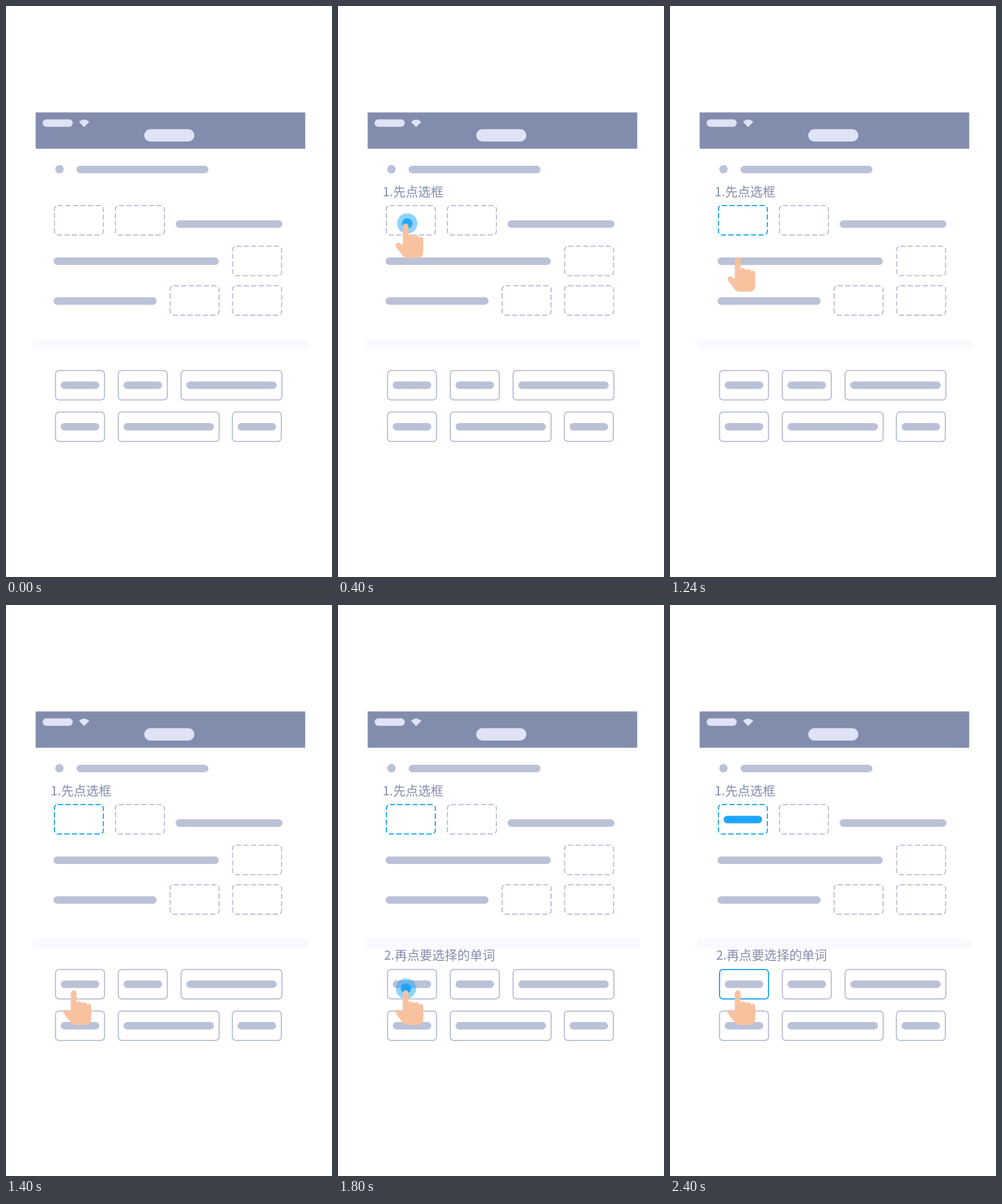
An HTML page with a canvas that plays this animation: 566 px wide and 990 px high, repeating every 3.24 s.

```html
<!DOCTYPE html>
<html lang="zh">
<head>
<meta charset="utf-8">
<title>Fill in the blanks</title>
<style>
html, body { margin: 0; width: 100%; height: 100%; overflow: hidden; background: #fff; }
canvas { display: block; width: 566px; height: 990px; }
</style>
</head>
<body>
<canvas id="stage" width="566" height="990"></canvas>
<script>
const ctx = document.getElementById('stage').getContext('2d');
const LOOP = 3240, STEP = 40;
const GREY = [187, 193, 215], BLUE = [31, 166, 252];
const INK = '#828cad', PALE = '#e0e2f5', SKIN = '#f9c29f';

const rgb = c => `rgb(${c.map(Math.round).join()})`;
const mix = k => rgb(GREY.map((v, i) => v + (BLUE[i] - v) * k));
const ramp = (t, from, to) => Math.min(1, Math.max(0, (t - from) / (to - from)));
const easeOut = k => 1 - (1 - k) ** 3;

const hand = new Path2D(
  'M12.5 38V5.2a5 5 0 0 1 10 0V21.5C24 18.3 30.5 18.3 32 23' +
  'C34 19.3 40 20.3 40.7 25C43.5 21.8 48 23.8 48 28.5V49' +
  'Q48 60 37 60H21Q15 60 11.5 55L1 41C-2 36 3.5 31.3 7.5 34.5Z');

function pill(x, y, w, h = 13, color = rgb(GREY)) {
  ctx.fillStyle = color;
  ctx.beginPath();
  ctx.roundRect(x, y, w, h, h / 2);
  ctx.fill();
}

function frame(x, y, w, color = rgb(GREY), dash = []) {
  ctx.strokeStyle = color;
  ctx.lineWidth = 2;
  ctx.setLineDash(dash);
  ctx.beginPath();
  ctx.roundRect(x + 1, y + 1, w - 2, 51, 6);
  ctx.stroke();
}

const slot = (x, y, color) => frame(x, y, 87, color, [9, 4.08]);

function word(x, y, w, color) {
  frame(x, y, w, color);
  pill(x + 10, y + 20, w - 20);
}

function disc(x, y, r, color) {
  ctx.fillStyle = color;
  ctx.beginPath();
  ctx.arc(x, y, r, 0, Math.PI * 2);
  ctx.fill();
}

function faded(alpha, draw) {
  if (alpha <= 0) return;
  ctx.save();
  ctx.globalAlpha = alpha;
  draw();
  ctx.restore();
}

function label(text, x, y, alpha) {
  faded(alpha, () => {
    ctx.fillStyle = INK;
    ctx.font = '300 21.8px "Noto Sans CJK SC", "Noto Sans CJK", sans-serif';
    ctx.fillText(text, x, y);
  });
}

function ripple(x, y, scale) {
  if (scale <= 0) return;
  faded(0.5, () => disc(x, y, 17.6 * scale, rgb(BLUE)));
  disc(x, y, 9 * scale, rgb(BLUE));
}

function header() {
  ctx.fillStyle = INK;
  ctx.fillRect(51.5, 184.5, 468, 63);
  pill(63.5, 196.5, 52.5, 13, PALE);
  pill(240, 213.5, 87, 21.5, PALE);
  ctx.fillStyle = PALE;
  ctx.beginPath();
  ctx.moveTo(135.7, 210);
  ctx.lineTo(126.8, 201);
  ctx.quadraticCurveTo(135.7, 193.2, 144.7, 201);
  ctx.fill();
}

function draw(t) {
  const enter = easeOut(ramp(t, 0, 360));
  const pick = ramp(t, 800, 1000);
  const drop = ramp(t, 1200, 1400);
  const hint = easeOut(ramp(t, 1400, 1760));
  const fill = ramp(t, 2200, 2400);

  ctx.fillStyle = '#fff';
  ctx.fillRect(0, 0, 566, 990);
  header();

  disc(92.8, 283, 7.3, rgb(GREY));
  pill(122.5, 277, 229);
  label('1.先点选框', 77.5, 329.5, enter);

  slot(83, 345, mix(pick));
  slot(189, 345);
  pill(294.5, 371.5, 185.5);
  pill(82.5, 436, 287);
  slot(392.5, 415.5);
  pill(82.5, 505, 179);
  slot(284, 484);
  slot(392.5, 484);
  faded(fill, () => pill(93, 365.5, 67, 13, rgb(BLUE)));

  ctx.fillStyle = '#f9f9ff';
  ctx.fillRect(47.5, 579.5, 477, 15.5);
  label('2.再点要选择的单词', 80, 615.2, hint);

  word(85, 631, 87, mix(fill));
  word(194, 631, 87);
  word(303, 631, 177);
  word(85, 703, 87);
  word(194, 703, 177);
  word(392, 703, 87);

  if (t >= 400) ripple(120.2, 377, 1 - pick);
  if (t >= 1800) ripple(118, 665, 1 - fill);

  faded(enter, () => {
    ctx.translate(100 + 120 * (1 - enter), 377 - 83 * (1 - enter) + 291 * drop);
    ctx.fillStyle = SKIN;
    ctx.fill(hand);
  });
}

const start = performance.now();
function tick() {
  const t = (performance.now() - start) % LOOP;
  draw(Math.floor(t / STEP) * STEP);
  requestAnimationFrame(tick);
}
tick();
</script>
</body>
</html>
```
